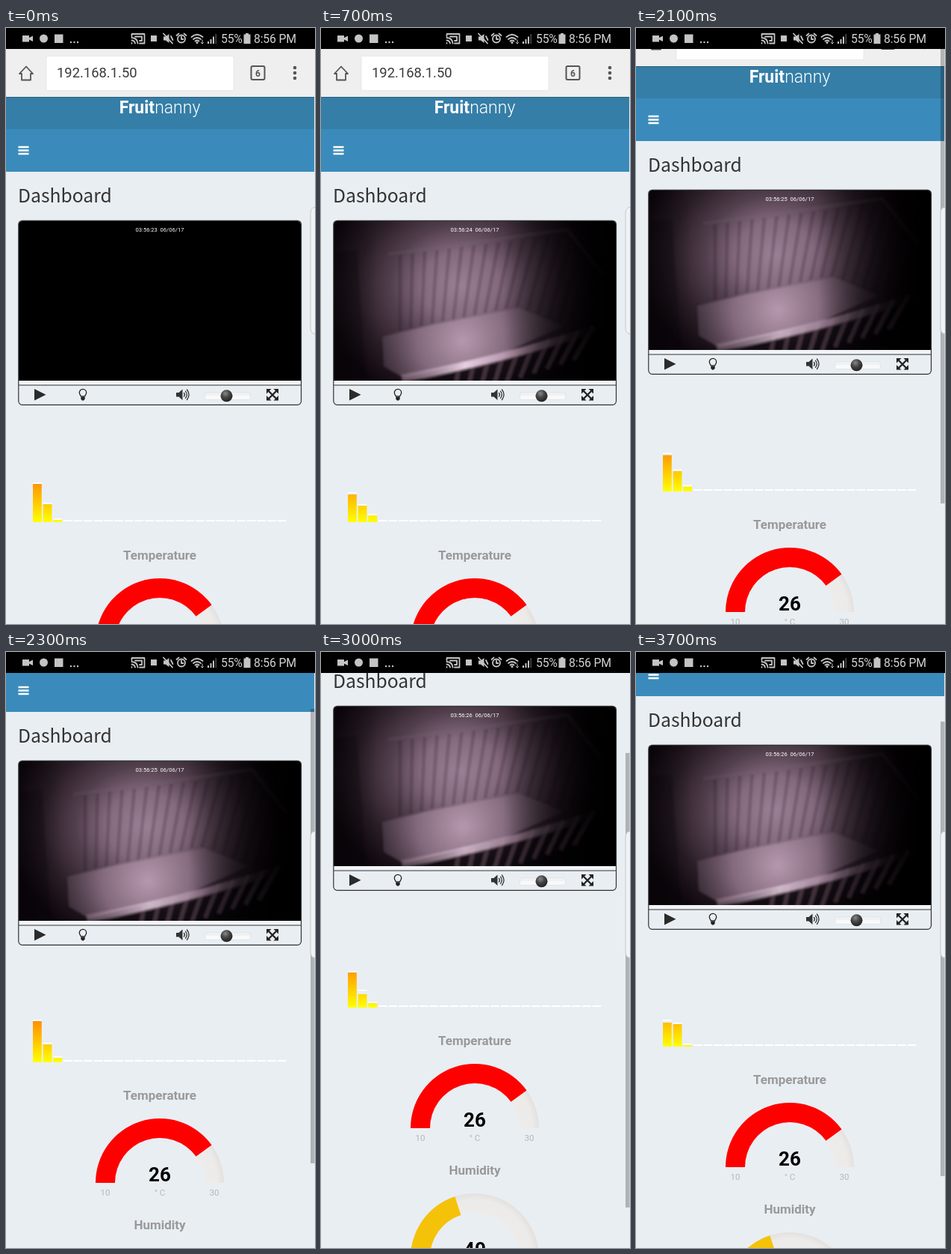
These frames come from a looping animation (414 px wide and 796 px high, 3.8 s). An HTML page:

```html
<!DOCTYPE html>
<html lang="en">
<head>
<meta charset="utf-8">
<title>Dashboard</title>
<style>
html, body { margin: 0; width: 100%; height: 100%; overflow: hidden; background: #e9eef3; }
svg { display: block; width: 414px; height: 796px; font-family: Roboto, "Liberation Sans", sans-serif; }
.mid { text-anchor: middle; }
.title { font-size: 17px; font-weight: 700; fill: #999; }
.value { font-size: 26px; font-weight: 700; fill: #000; }
.label { font-size: 11.5px; fill: #b6b6b6; }
.line { fill: none; stroke-linecap: round; stroke-linejoin: round; }
</style>
</head>
<body>
<svg viewBox="0 0 414 796">
  <defs>
    <clipPath id="screen"><path d="M17 471V263q0-5 5-5H390q5 0 5 5V471z"/></clipPath>
    <radialGradient id="glow" gradientUnits="userSpaceOnUse" cx="186" cy="344" r="185" gradientTransform="translate(0 45) scale(1 .87)">
      <stop offset="0" stop-color="#9a8094"/><stop offset=".28" stop-color="#836a7d"/>
      <stop offset=".5" stop-color="#523f4d"/><stop offset=".75" stop-color="#291d26"/><stop offset="1" stop-color="#0f080e"/>
    </radialGradient>
    <radialGradient id="bed" gradientUnits="userSpaceOnUse" cx="190" cy="418" r="135">
      <stop offset="0" stop-color="#b698ae"/><stop offset=".45" stop-color="#8a7083" stop-opacity=".9"/>
      <stop offset="1" stop-color="#3a2c37" stop-opacity=".4"/>
    </radialGradient>
    <linearGradient id="rail" gradientUnits="userSpaceOnUse" x1="100" y1="0" x2="365" y2="0">
      <stop offset="0" stop-color="#8a6f82" stop-opacity=".5"/><stop offset=".35" stop-color="#e8cfe2"/>
      <stop offset=".6" stop-color="#a98aa1"/><stop offset="1" stop-color="#1d131b" stop-opacity=".3"/>
    </linearGradient>
    <linearGradient id="shade">
      <stop offset="0" stop-color="#000" stop-opacity=".3"/><stop offset=".15" stop-color="#000" stop-opacity="0"/>
      <stop offset=".6" stop-color="#000" stop-opacity="0"/><stop offset=".9" stop-color="#000" stop-opacity=".8"/>
      <stop offset="1" stop-color="#000" stop-opacity=".95"/>
    </linearGradient>
    <linearGradient id="level" gradientUnits="userSpaceOnUse" x1="0" y1="660" x2="0" y2="535">
      <stop offset="0" stop-color="#ff0"/><stop offset="1" stop-color="#f00"/>
    </linearGradient>
    <radialGradient id="dial" gradientUnits="userSpaceOnUse" cx="0" cy="0" r="86">
      <stop offset=".7" stop-color="#eeecea"/><stop offset=".9" stop-color="#edebe9"/><stop offset="1" stop-color="#e3e1df"/>
    </radialGradient>
    <radialGradient id="knob" cx=".4" cy=".3" r=".7">
      <stop offset="0" stop-color="#888"/><stop offset=".5" stop-color="#444"/><stop offset="1" stop-color="#222"/>
    </radialGradient>
    <filter id="soft"><feGaussianBlur stdDeviation="1.8"/></filter>
  </defs>

  <rect width="414" height="796" fill="#e9eef3"/>
  <g id="page">
    <!-- browser toolbar -->
    <rect y="28" width="414" height="64" fill="#eeefee"/>
    <rect x="54" y="37.5" width="251" height="46" rx="2" fill="#fff" stroke="#e2e3e2" stroke-width=".7"/>
    <path class="line" d="M18 61L27 51.5 36 61H33V69.500H21V61z" stroke="#555" stroke-width="1.800"/>
    <text x="68" y="66.3" font-size="18.4" fill="#3a3a3a">192.168.1.50</text>
    <rect x="328.5" y="51" width="18" height="18" rx="2" fill="none" stroke="#555" stroke-width="2"/>
    <text class="mid" x="337.5" y="64.5" font-size="12" font-weight="700" fill="#555">6</text>
    <g fill="#555"><circle cx="387" cy="53" r="2.3"/><circle cx="387" cy="60" r="2.3"/><circle cx="387" cy="67" r="2.3"/></g>

    <!-- site header -->
    <rect y="92" width="413" height="43" fill="#357ea7"/>
    <rect y="92" width="413" height="1" fill="#2a5d7b"/>
    <rect y="135" width="413" height="57" fill="#3a8bbb"/>
    <text class="mid" x="206" y="114" font-size="23" fill="#fff"><tspan font-weight="700">Fruit</tspan><tspan font-weight="300">nanny</tspan></text>
    <path d="M16.5 159H30.5M16.5 163.5H30.5M16.5 168H30.5" stroke="#fff" stroke-width="2.4"/>
    <text x="16" y="232.6" font-size="24.7" fill="#333" style="font-family:'Noto Sans CJK JP','Noto Sans CJK SC','Noto Sans CJK',sans-serif">Dashboard</text>

    <!-- video -->
    <g clip-path="url(#screen)">
      <rect x="17" y="257" width="379" height="214"/>
      <g id="crib">
        <rect x="17" y="257" width="379" height="214" fill="url(#glow)"/>
        <g filter="url(#soft)">
          <path d="M17 300L48 297 60 471H17z" fill="#0b060a" opacity=".2"/>
          <path id="bars" fill="none" stroke="#1a1018" stroke-width="3.2"/>
          <path d="M90 302L330 269 378 330" fill="none" stroke="#756071" stroke-width="4" opacity=".2"/>
          <path d="M82 412L150 396 265 374 325 398 250 432 112 468 84 452z" fill="url(#bed)"/>
          <path d="M130 471L355 408 396 400V471z" fill="#0d070c" opacity=".5"/>
          <path id="posts" fill="none" stroke="#6d5567" stroke-width="5" opacity=".5"/>
          <path id="rim" d="M108 468Q240 444 362 403" fill="none" stroke="url(#rail)" stroke-width="10"/>
        </g>
        <rect x="17" y="257" width="379" height="214" fill="url(#shade)"/>
      </g>
      <text id="clock" class="mid" x="206" y="271.5" font-size="7.6" fill="#fff" xml:space="preserve"></text>
    </g>
    <rect x="17" y="471" width="378" height="6" fill="#f1f4f7"/>
    <path d="M17 477H395" stroke="#333" stroke-width="1"/>
    <rect x="16.8" y="257.3" width="378.7" height="246" rx="5" fill="none" stroke="#333" stroke-width="1.2"/>

    <!-- controls -->
    <path d="M38 482L53.5 489.7 38 497.5z" fill="#2b2b2b"/>
    <path class="line" d="M100.5 492Q98.3 489 98.3 487A4.7 4.7 0 0 1 107.7 487Q107.7 489 105.5 492z" stroke="#222" stroke-width="1.3"/>
    <path d="M100.3 493H105.7V495.5L104 497.5H102L100.3 495.5z" fill="#222"/>
    <path d="M228 487H231.5L236.5 482.5V497L231.5 492.5H228z" fill="#333"/>
    <path class="line" d="M238.5 487.5Q240.3 489.7 238.5 492M240.5 485.2Q244 489.7 240.5 494.3M242.5 483Q247.5 489.7 242.5 496.5" stroke="#333" stroke-width="1.3"/>
    <rect x="266" y="486.5" width="62" height="10" rx="4" fill="#eff1f3" stroke="#dde1e4" stroke-width=".8"/>
    <rect x="267" y="491" width="60" height="5" rx="2.5" fill="#f8f9fa"/>
    <circle cx="295.5" cy="491.3" r="8" fill="url(#knob)"/>
    <path d="M352 485L362 495M362 485L352 495" stroke="#222" stroke-width="2.3"/>
    <path d="M349 482H355.5L349 488.5zM365 482V488.5L358.5 482zM349 497.5V491L355.5 497.5zM365 497.5H358.5L365 491z" fill="#222"/>

    <path id="dashes" fill="#fff"/>
    <path id="levels" fill="url(#level)"/>
    <path id="caps" fill="#fff"/>
    <g id="gauges"></g>
  </g>

  <rect id="thumb" x="408" width="5.5" height="607" fill="#000" opacity=".25"/>
  <path d="M415 239.5H413Q408 241 408 247V401Q408 407 413 408.5H415z" fill="#f0f3f5" stroke="#c3c7ca" stroke-width="1"/>

  <!-- phone status bar -->
  <rect width="414" height="28"/>
  <g fill="#c4c4c4">
    <path d="M22 10H31V13L36 10.5V18L31 15.5V18.5H22z"/>
    <circle cx="50.5" cy="14" r="5.5"/>
    <rect x="65" y="8.5" width="11.5" height="11.5"/>
    <circle cx="87" cy="19" r="1.2"/><circle cx="91.5" cy="19" r="1.2"/><circle cx="96" cy="19" r="1.2"/>
    <rect x="194" y="10" width="8" height="8"/>
    <path d="M211 11.5H214L218.5 8V20L214 16.5H211z"/>
    <path d="M318.5 8.5H321V7H325V8.5H327.5V21H318.5z"/>
    <path d="M270 21V18H272V21zM273.5 21V15H275.5V21zM277 21V11.5H279V21z"/>
    <path d="M280.5 21V8H282V21z" opacity=".4"/>
    <circle cx="256" cy="19.5" r="1.5"/>
  </g>
  <g class="line" stroke="#c4c4c4" stroke-width="1.8">
    <path d="M168.5 11V8H185.5V20.5H179M168.5 13Q176 13.5 176.5 20.5M168.5 16.5Q172.5 17 173 20.5M168.5 20V20.5M173 11.5H182V17H179"/>
    <path d="M211 7.5L223 20.5M221 11L223.5 16"/>
    <circle cx="235" cy="14.5" r="5"/><path d="M235 11.5V15H237.5M228.5 10L231.5 7.5M241.5 10L238.5 7.5"/>
    <path d="M248.5 12Q256 5.5 263.5 12M251 15Q256 11 261 15M253.5 17.5Q256 15.5 258.5 17.5"/>
    <path d="M263 16V21M261.5 19.5L263 21 264.5 19.5" stroke-width="1"/>
  </g>
  <g font-size="15.8" letter-spacing="-.2" fill="#d2d2d2"><text x="288" y="20.3">55%</text><text x="332" y="20.3">8:56 PM</text></g>
</svg>
<script>
const LOOP = 3800, STEP = 100, BASE = 660;
const $ = id => document.getElementById(id);
const range = n => [...Array(n).keys()];
const set = (id, name, value) => $(id).setAttribute(name, value);

// time, three sound levels, brightness of the front rail
const sound = [
  [0, 51, 24, 3, .9], [700, 37, 22, 9, 1], [1500, 42, 37, 3, .6], [2300, 55, 24, 6, .85],
  [2700, 49, 30, 9, .9], [3000, 47, 18, 6, .8], [3700, 32, 30, 2, .85], [3800, 32, 30, 2, .85]
];
// time, scroll position, speed in px/ms
const drag = [[1900, 0, 0], [2300, 112, .3], [2700, 210, 0], [3000, 185, -.08], [3700, 133, -.07], [3800, 126, -.07]];

function span(keys, t) {
  const i = Math.max(1, keys.findIndex(k => k[0] > t));
  const a = keys[i - 1], b = keys[i];
  return [a, b, (t - a[0]) / (b[0] - a[0])];
}

function scrollAt(t) {
  if (t <= drag[0][0]) return 0;
  const [a, b, u] = span(drag, t), d = b[0] - a[0], v = 1 - u;
  return v * v * (1 + 2 * u) * a[1] + u * v * v * d * a[2] + u * u * (3 - 2 * u) * b[1] - u * u * v * d * b[2];
}

function levelAt(t, n) {
  const [a, b, u] = span(sound, Math.max(0, t));
  const wobble = Math.sin(Math.PI * u) * Math.sin(t * .017 + n * 2) * [5, 4, 2][n];
  return Math.max(2, a[n + 1] + (b[n + 1] - a[n + 1]) * u + wobble);
}

const capAt = (t, n) => Math.max(...range(4).map(k => levelAt(t - k * STEP, n) - k * 3));
const box = (n, top, h) => `M${36 + n * 13.65} ${top}h11.8v${h}h-11.8z`;

function arc(part) {
  const a = Math.PI * (1 - part), c = Math.cos(a), s = -Math.sin(a);
  return `M-86 0A86 86 0 0 1 ${86 * c} ${86 * s}L${60 * c} ${60 * s}A60 60 0 0 0 -60 0z`;
}

function gauge(y, title, value, min, unit, max, color) {
  const text = (kind, x, y, s) => `<text class="mid ${kind}" x="${x}" y="${y}">${s}</text>`;
  return `<g transform="translate(206 ${y})">` + text('title', 0, -111, title) +
    `<path d="${arc(1)}" fill="url(#dial)"/><path d="${arc((value - min) / (max - min))}" fill="${color}"/>` +
    text('value', 0, -2.5, value) + text('label', -73, 16.5, min) + text('label', 0, 16.5, unit) +
    text('label', 73, 16.5, max) + '</g>';
}

$('gauges').innerHTML = gauge(821, 'Temperature', 26, 10, '° C', 30, '#f00') +
  gauge(994, 'Humidity', 40, 0, '%', 100, '#f5c20a');
set('dashes', 'd', range(22).map(n => box(n + 3, 657, 2)).join(''));
set('bars', 'd', range(18).map(i => {
  const x = 106 + i * 15, low = i < 11 ? 408 - i * 3.3 : 374 + (i - 11) * 5;
  return `M${x + i * 1.5} ${302 - i * 2}L${x - i * .8} ${low}`;
}).join(''));
set('bars', 'opacity', .25);
set('posts', 'd', range(10).map(i => `M${185 + i * 20} ${452 - i * 6}l${-8 - i * 2} 45`).join(''));

function draw(now) {
  const t = Math.floor(now % LOOP / STEP) * STEP, y = scrollAt(t);
  set('page', 'transform', `translate(0 ${-y})`);
  set('thumb', 'y', Math.max(28, 38 + .807 * (y - 65)));
  set('thumb', 'visibility', y > 0 ? 'visible' : 'hidden');
  set('crib', 'opacity', Math.min(1, Math.max(0, (t - 100) / 300)));
  const [a, b, u] = span(sound, t);
  set('rim', 'opacity', a[4] + (b[4] - a[4]) * u);
  const second = 23 + [300, 1700, 2500].filter(s => t >= s).length;
  $('clock').textContent = `03:56:${second}  06/06/17`;
  set('levels', 'd', range(3).map(n => box(n, BASE - levelAt(t, n), levelAt(t, n))).join(''));
  set('caps', 'd', range(3).map(n => box(n, BASE - capAt(t, n) - 2, 1.6)).join(''));
}

let start;
function tick(now) {
  start ??= now;
  draw(now - start);
  requestAnimationFrame(tick);
}
draw(0);
requestAnimationFrame(tick);
</script>
</body>
</html>
```
